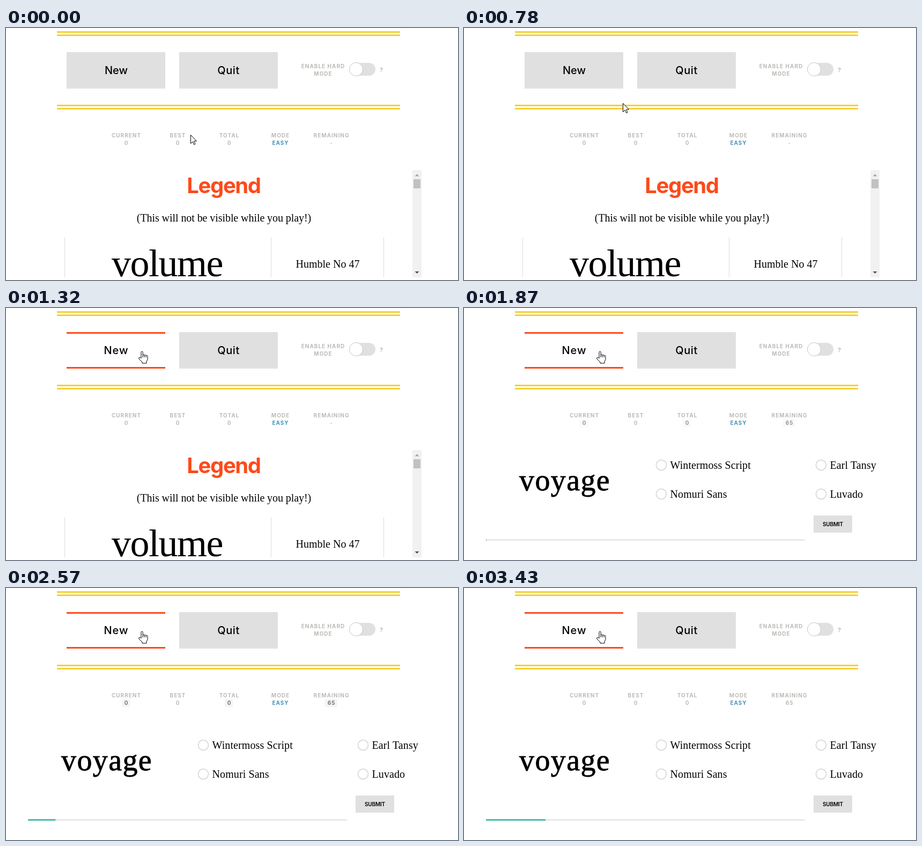
Write an HTML page that moves like this. It is 843 by 470 pixels and loops after 3510 ms.

```html
<!DOCTYPE html>
<html lang="en">
<head>
<meta charset="utf-8">
<title>Typeface quiz</title>
<style>
html, body { margin: 0; width: 100%; height: 100%; overflow: hidden; background: #fff; }
svg { display: block; font-family: Inter, "Open Sans", sans-serif; }
.mid { text-anchor: middle; }
.btn { font-size: 20px; font-weight: 500; }
.small { font-size: 10px; font-weight: 700; letter-spacing: 1px; fill: #bbbbb7; }
.serif { font: 20px "Liberation Serif", "Times New Roman", serif; }
.volume { font-size: 72px; letter-spacing: -1.5px; }
.voyage { font-size: 56px; letter-spacing: 1.4px; stroke: #000; stroke-width: .8px; }
</style>
</head>
<body>
<svg width="843" height="470" viewBox="0 0 843 470">
  <path fill="#f3d03a" d="M95 6h640v3H95zM95 12h640v3H95zM95 143h640v3H95zM95 149h640v3H95z"/>

  <rect id="newBg" x="113" y="45" width="184" height="68"/>
  <path id="newEdge" d="M113 45h184v3H113zM113 110h184v3H113z"/>
  <text id="newText" class="btn mid" x="205.5" y="86">New</text>
  <rect x="323" y="45" width="184" height="68" fill="#e0e0e0"/>
  <text class="btn mid" x="415" y="86" letter-spacing=".6">Quit</text>

  <g class="small mid">
    <text x="591.5" y="75">ENABLE HARD</text>
    <text x="591.5" y="89">MODE</text>
    <text x="700.5" y="82" font-size="11">?</text>
  </g>
  <rect x="641" y="65" width="48" height="24" rx="12" fill="#e0e0e0"/>
  <circle cx="653" cy="77" r="12.5" fill="#fff" stroke="#c6c6c6"/>

  <g id="stats" class="small mid"></g>

  <g id="legend">
    <text class="mid" x="406" y="308" font-size="40" font-weight="700" letter-spacing="-1.4" fill="#fc4a1a">Legend</text>
    <text class="serif mid" x="406.5" y="361" letter-spacing="-.07">(This will not be visible while you play!)</text>
    <path fill="#ddd" d="M109 390h1v75h-1zM494 390h1v75h-1zM704 390h1v75h-1z"/>
    <text class="serif volume" x="197" y="463">volume</text>
    <text class="serif mid" x="600" y="447">Humble No 47</text>
    <path fill="#f1f1f1" d="M758 265h17v200h-17z"/>
    <path fill="#c1c1c1" d="M760 282h13v17h-13z"/>
    <path fill="#a3a3a3" d="M762.5 276.5l4-4 4 4z"/>
    <path fill="#505050" d="M762.5 454l4 4 4-4z"/>
    <path fill="#fff" d="M0 465h843v5H0z"/>
  </g>

  <g id="quiz">
    <text class="serif voyage" x="103" y="340">voyage</text>
    <g id="choices" class="serif"></g>
    <rect x="652" y="387" width="72" height="32" fill="#e0e0e0"/>
    <text class="mid" x="688" y="407" font-size="10" font-weight="600" letter-spacing="-.2">SUBMIT</text>
    <rect x="41" y="431" width="595" height="3" fill="#e9e9e9"/>
    <rect id="bar" x="41" y="431" height="3" fill="#4abdac"/>
  </g>

  <g fill="#fff" stroke="#000" stroke-linejoin="round">
    <path id="arrow" d="M.5 .5V16.5L4.2 13L6.6 18.5L9 17.5L6.6 12H11.5Z"/>
    <path id="hand" d="M5 14V2.5a1.6 1.6 0 0 1 3.2 0V8a1.55 1.55 0 0 1 3 .5a1.55 1.55 0 0 1 3 .7a1.5 1.5 0 0 1 2.8 1V16L15 20V23H7V21L1 15Q-.2 12.5 2 12Q3.8 12 5 14ZM8.2 8v4M11.2 8.5v3.5M14.2 9.5v2.5"/>
  </g>
</svg>
<script>
const LOOP = 3510, QUIZ_START = 1870;
const $ = id => document.getElementById(id);
const clamp = x => Math.min(1, Math.max(0, x));
const mix = (a, b, p) => a + (b - a) * p;
const blend = (a, b, p) => `rgb(${a.map((v, i) => Math.round(mix(v, b[i], p)))})`;
const set = (id, attrs) => {
  for (const name in attrs) $(id).setAttribute(name, attrs[name]);
};
const show = (id, on) => { $(id).style.display = on ? '' : 'none'; };

const GREY = [224, 224, 224], WHITE = [255, 255, 255];
const ORANGE = [252, 74, 26], LABEL = [187, 187, 183], BLACK = [0, 0, 0];

// label, centre, value, highlight width
const stats = [
  ['CURRENT', 224, '0', 15], ['BEST', 320, '0', 0], ['TOTAL', 416, '0', 15],
  ['MODE', 511.5, 'EASY', 0], ['REMAINING', 606.5, '-', 23]
];
$('stats').innerHTML = stats.map(([label, x, value, w]) => `
  <text x="${x + .5}" y="204">${label}</text>
  ${w ? `<rect class="flash" x="${x - w / 2 - .5}" y="207" width="${w}" height="15" fill="#e0e0e0"/>` : ''}
  <text id="val${label}" class="${w ? 'value' : ''}" x="${x + .5}" y="218"
    ${value === 'EASY' ? 'fill="#4a93b8"' : ''}>${value}</text>`).join('');

const choices = [
  ['Wintermoss Script', 368, 293], ['Earl Tansy', 666, 293],
  ['Nomuri Sans', 368, 347], ['Luvado', 666, 347]
];
$('choices').innerHTML = choices.map(([name, x, y]) => `
  <circle cx="${x}" cy="${y}" r="9.5" fill="#fff" stroke="#ddd" stroke-width="2"/>
  <text x="${x + 16.5}" y="${y + 7}" letter-spacing=".1">${name}</text>`).join('');

// The pointer moves in discrete steps along a few time, x, y stops.
const ticks = [0, 490, 560, 640, 710, 780, 870, 940, 1010, 1090, 1170, 1240, 1320];
const stops = [[420, 344, 199], [780, 296, 140], [1010, 265, 100], [1320, 254, 80]];

function pointerAt(t) {
  if (t <= stops[0][0]) return stops[0].slice(1);
  const i = stops.findIndex(s => s[0] >= t);
  if (i < 0) return stops.at(-1).slice(1);
  const [a, b] = [stops[i - 1], stops[i]];
  const p = (t - a[0]) / (b[0] - a[0]);
  return [1, 2].map(k => Math.round(mix(a[k], b[k], p)));
}

function drawPointer(t) {
  const tick = ticks.findLast(v => v <= t);
  const [x, y] = pointerAt(tick);
  const over = y < 113;
  show('arrow', !over);
  show('hand', over);
  set('arrow', { transform: `translate(${x} ${y})` });
  set('hand', { transform: `translate(${x - 7} ${y})` });

  const p = over ? clamp((tick - 880) / 420) : 0;
  set('newBg', { fill: blend(GREY, WHITE, p) });
  set('newEdge', { fill: blend(GREY, ORANGE, p) });
  set('newText', { 'letter-spacing': p });
}

function drawQuiz(t) {
  const on = t >= QUIZ_START;
  show('legend', !on);
  show('quiz', on);
  $('valREMAINING').textContent = on ? '65' : '-';

  const step = Math.max(0, Math.floor((t - 1850) / 78.5));
  set('bar', { width: step ? 2.4 + 5.43 * step : 1 });

  const stepTime = 1850 + step * 78.5;
  const rise = clamp((stepTime - 1795) / 540);
  const fall = clamp((stepTime - 2345) / 540);
  const glow = on ? (1 - (1 - rise) ** 2) * (1 - fall) ** 2 : 0;
  document.querySelectorAll('.flash').forEach(e => { e.style.opacity = glow; });
  document.querySelectorAll('.value').forEach(e => { e.style.fill = blend(LABEL, BLACK, glow); });
}

const start = performance.now();
function frame() {
  const t = (performance.now() - start) % LOOP;
  drawPointer(t);
  drawQuiz(t);
  requestAnimationFrame(frame);
}
frame();
</script>
</body>
</html>
```
